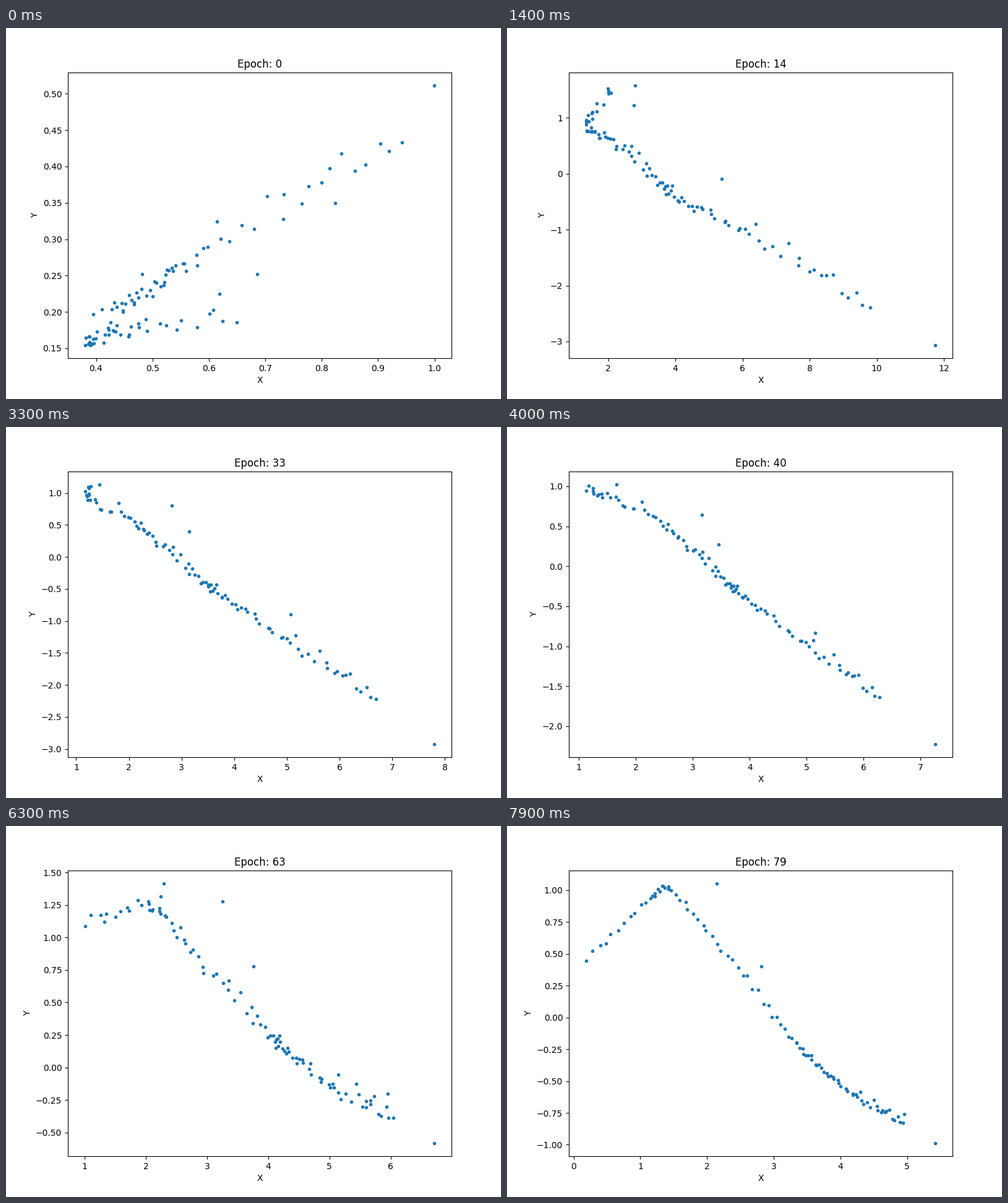
These frames come from a looping animation (800 by 600 pixels, 8 s). A matplotlib script:

```python
import numpy as np
import matplotlib.pyplot as plt
from matplotlib.animation import FuncAnimation

EPOCHS = 80
COUNT = 95
SWELL = .12     # overshoot in y between poses

ranks = np.array([0, 10, 20, 30, 45, 60, 75, COUNT - 1])
rng = np.random.default_rng(4)
# Loose sideways, with a longer tail above the curve than below it.
jitter = np.array([.3 * rng.normal(size=COUNT),
                   np.clip(rng.gumbel(-.4, .9, COUNT), -1.5, 2.5)])
jitter[:, ranks] = 0


def curve(knots):
    """Smooth path through the knots, one value per point."""
    at = np.arange(COUNT)
    k = np.clip(np.searchsorted(ranks, at, side="right") - 1,
                0, len(ranks) - 2)
    width = ranks[k + 1] - ranks[k]
    t = (at - ranks[k]) / width
    slope = np.gradient(knots, ranks)
    ease = t * t * (3 - 2 * t)
    return ((1 - ease) * knots[k] + ease * knots[k + 1]
            + width * t * (1 - t) * ((1 - t) * slope[k] - t * slope[k + 1]))


def pose(spread, xs, ys, *strays):
    """Points loosely strung along a curve, plus strays that stand apart."""
    knots = np.array([xs, ys])
    strays = np.array(strays).T
    ends = np.hstack([knots, strays])
    low = ends.min(axis=1, keepdims=True)
    high = ends.max(axis=1, keepdims=True)
    line = np.array([curve(k) for k in knots])
    line += spread * jitter * (high - low)
    # Fold back whatever leaves the bounds.
    line = low + abs(line - low)
    line = high - abs(high - line)
    return np.hstack([line, strays])


# Strays: two above the curve, one near the end, the crest and the tip.
keys = {
    0: pose(.028, [.624, .476, .431, .381, .445, .507, .59, .942],
            [.187, .179, .174, .1542, .212, .24, .288, .433],
            (.686, .252), (.619, .225), (.824, .35),
            (.649, .186), (.9992, .5113)),
    14: pose(.017, [2.08, 1.346, 1.6, 2.16, 3.41, 4.256, 6.08, 9.8],
             [1.45, .93, .75, .618, -.046, -.49, -.988, -2.394],
             (2.805, 1.58), (2.77, 1.225), (5.38, -.09),
             (2, 1.48), (11.735, -3.067)),
    26: pose(.015, [1.35, .987, 1.69, 2.07, 3.11, 3.785, 5.02, 7.11],
             [.971, .73, .476, .267, -.39, -.752, -1.324, -2.324],
             (2.48, .79), (2.835, .43), (4.98, -.77),
             (1.21, 1), (8.33, -3)),
    40: pose(.012, [1.13, 1.55, 2.3, 2.835, 3.54, 3.96, 4.985, 6.28],
             [.946, .86, .63, .327, -.145, -.41, -.95, -1.64],
             (3.16, .645), (3.455, .273), (5.15, -.833),
             (1.66, 1.023), (7.255, -2.225)),
    50: pose(.018, [1.104, 1.81, 2.38, 2.81, 3.64, 4.01, 4.85, 5.87],
             [1.158, 1.05, .91, .703, .283, .12, -.176, -.582],
             (3.45, .95), (3.695, .59), (5.53, -.186),
             (1.807, 1.232), (6.592, -.842)),
    63: pose(.02, [1.01, 1.93, 2.31, 2.86, 3.95, 4.34, 5.05, 6.04],
             [1.087, 1.25, 1.167, .854, .312, .122, -.125, -.386],
             (3.25, 1.276), (3.76, .78), (5.95, -.2),
             (2.295, 1.4145), (6.71, -.581)),
    79: pose(.009, [.19, 1.08, 1.42, 2.08, 3.17, 3.71, 4.23, 4.94],
             [.445, .9, 1.01, .64, -.09, -.397, -.606, -.83],
             (2.15, 1.052), (2.81, .4), (4.96, -.76),
             (1.42, 1.03), (5.42, -.988)),
}
times = list(keys)


def cloud(epoch):
    k = min(np.searchsorted(times, epoch, side="right") - 1, len(times) - 2)
    a, b = times[k], times[k + 1]
    t = (epoch - a) / (b - a)
    mix = t if k else t ** 2.5      # training takes off slowly
    x, y = (1 - mix) * keys[a] + mix * keys[b]
    return x, y * (1 + SWELL * np.sin(np.pi * t))


fig, ax = plt.subplots(figsize=(8, 6), dpi=100)
dots, = ax.plot([], [], ".", color="tab:blue")
ax.set_xlabel("X")
ax.set_ylabel("Y")


def update(epoch):
    dots.set_data(*cloud(epoch))
    ax.relim()
    ax.autoscale_view()
    ax.set_title(f"Epoch: {epoch}")
    return dots,


anim = FuncAnimation(fig, update, frames=EPOCHS, interval=100,
                     repeat=True, repeat_delay=0)
plt.show()
```
